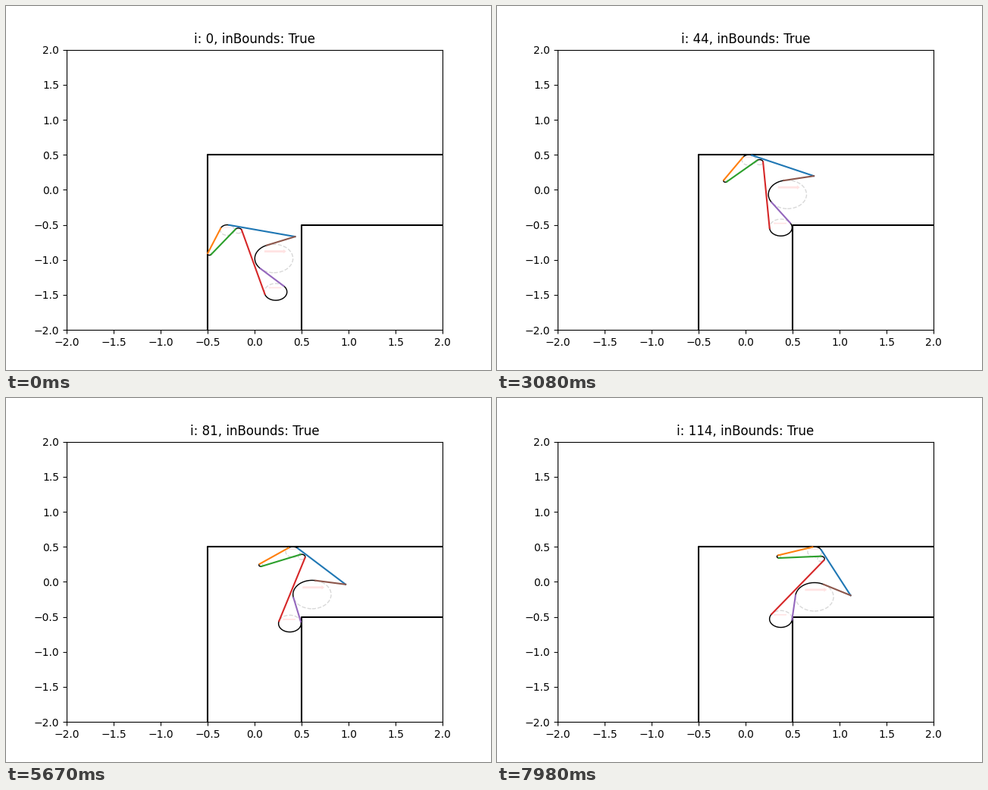
Write a matplotlib script that moves like this. It is 640 px wide and 480 px high and loops after 8 s.

```python
import numpy as np
import matplotlib.pyplot as plt
from matplotlib.animation import FuncAnimation
from matplotlib.patches import Circle, Polygon

FRAMES = 115
LOOP_MS = 8000
RISE, SLIDE = 10, 15  # steps spent moving up, then right, before turning

# Corner circles in counter-clockwise order; a negative radius is a concave corner.
CENTERS = np.array([
    [0.431, -0.668], [-0.290, -0.575], [-0.480, -0.913],
    [-0.1726, -0.584], [0.225, -1.457], [0.2056, -0.980],
])
RADII = np.array([0, 0.075, 0.02, -0.037, 0.12, -0.203])
TOP, FOOT = 1, 4
N = len(RADII)


def pose(i):
    """Circle centres at step i."""
    up = 0.1 * min(i, RISE)
    right = 0.01 * np.clip(i - RISE, 0, SLIDE)
    pts = CENTERS + [right, up]
    turn = 0.01 * max(0, i - RISE - SLIDE)
    if turn:
        c, s = np.cos(turn), np.sin(turn)
        fixed = [pts[FOOT, 0], pts[TOP, 1]]
        pts = pts @ np.array([[c, -s], [s, c]])
        # slide along the ceiling and the inner wall
        pts += [fixed[0] - pts[FOOT, 0], fixed[1] - pts[TOP, 1]]
    return pts


def rim(center, r, heading):
    """Point of a corner circle where the outline runs along heading."""
    return center + r * np.stack([np.sin(heading), -np.cos(heading)], axis=-1)


def headings(pts):
    d = np.roll(pts, -1, axis=0) - pts
    dr = np.roll(RADII, -1) - RADII
    return np.arctan2(d[:, 1], d[:, 0]) - np.arcsin(dr / np.hypot(*d.T))


def arrow_xy(center, r):
    """Arrow in the upper half of a circle, showing its sense of turn."""
    size, way = abs(r), -np.sign(r)
    x = np.array([-0.5, 0.5, 0.5, 0.65, 0.5, 0.5, -0.5]) * way
    y = 0.5 + np.array([-0.075, -0.075, -0.15, 0, 0.15, 0.075, 0.075])
    return center + size * np.column_stack([x, y])


fig, ax = plt.subplots(figsize=(6.4, 4.8), dpi=100)
ax.set_xlim(-2, 2)
ax.set_ylim(-2, 2)
title = ax.set_title("")

ax.plot([-0.5, -0.5, 2], [-2, 0.5, 0.5], color="black")
ax.plot([0.5, 0.5, 2], [-2, -0.5, -0.5], color="black")

rounded = [k for k in range(N) if RADII[k]]
arrows, guides, arcs = {}, {}, {}
for k in rounded:
    arrows[k] = ax.add_patch(Polygon(np.zeros((3, 2)), fc="red", ec="none",
                                     alpha=0.11))
    guides[k] = ax.add_patch(Circle((0, 0), abs(RADII[k]), fill=False, lw=1,
                                    ls="--", ec="gray", alpha=0.3))
    arcs[k], = ax.plot([], [], color="black", lw=1, zorder=1.5)
sides = [ax.plot([], [], color=f"C{k}")[0] for k in range(N)]


def update(i):
    pts = pose(i)
    head = headings(pts)
    for k in range(N):
        j = (k + 1) % N
        ends = [rim(pts[k], RADII[k], head[k]), rim(pts[j], RADII[j], head[k])]
        sides[k].set_data(*np.transpose(ends))
    for k in rounded:
        sign = np.sign(RADII[k])
        turn = sign * ((sign * (head[k] - head[k - 1])) % (2 * np.pi))
        sweep = head[k - 1] + np.linspace(0, turn, 60)
        arcs[k].set_data(*rim(pts[k], RADII[k], sweep).T)
        guides[k].center = pts[k]
        arrows[k].set_xy(arrow_xy(pts[k], RADII[k]))
    title.set_text(f"i: {i}, inBounds: True")
    return [title, *sides, *arcs.values(), *guides.values(), *arrows.values()]


anim = FuncAnimation(fig, update, frames=FRAMES, interval=LOOP_MS / FRAMES,
                     repeat=True, repeat_delay=0, blit=False)
plt.show()
```
